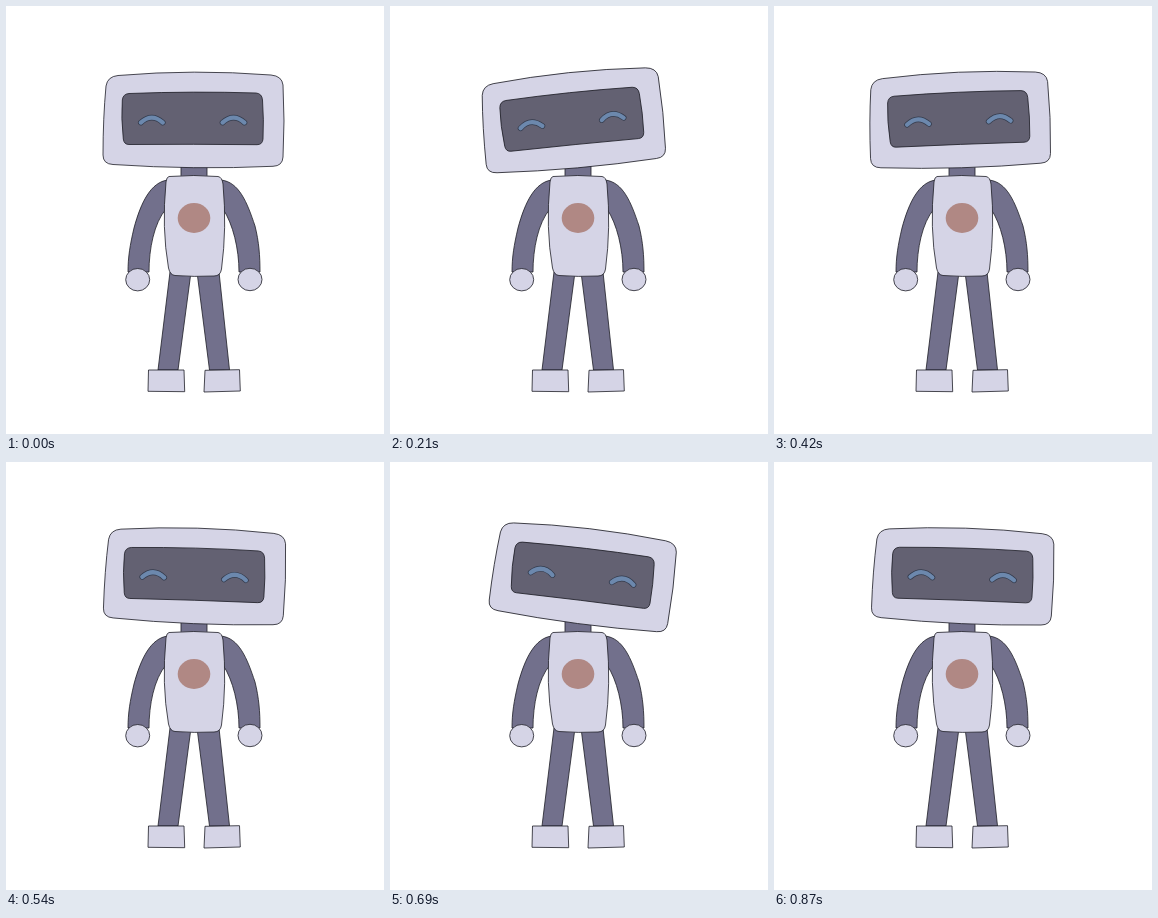
An HTML page with a canvas for the animation above (0.9 s loop, 378 px wide and 428 px high).

```html
<!DOCTYPE html>
<html lang="en">
<head>
<meta charset="utf-8">
<title>Robot tilting its head</title>
<style>
  html, body { margin: 0; width: 100%; height: 100%; overflow: hidden; background: #fff; }
  canvas { display: block; width: 378px; height: 428px; }
</style>
</head>
<body>
<canvas id="stage" width="378" height="428"></canvas>
<script>
const ctx = document.getElementById('stage').getContext('2d');

const LOOP = 900, STEP = 30;
const LIGHT = '#d5d4e6', LIMB = '#72708c', SCREEN = '#636172';
const EYE = '#6c88ad', HEART = '#b08884', INK = '#1d1d26';
const PIVOT = { x: 189, y: 162 };

// Head tilt in degrees: [time, angle], linear between the turning points.
const TILT = [[0, 0], [270, -7.4], [705, 7.4], [900, 1]];

function tiltAt(t) {
  const i = TILT.findIndex(([end]) => t < end);
  const [t0, a0] = TILT[i - 1], [t1, a1] = TILT[i];
  return a0 + (a1 - a0) * (t - t0) / (t1 - t0);
}

function shape(d, fill) {
  const path = new Path2D(d);
  ctx.fillStyle = fill;
  ctx.fill(path);
  ctx.strokeStyle = INK;
  ctx.lineWidth = 0.8;
  ctx.stroke(path);
}

function oval(x, y, rx, ry, fill, outlined) {
  ctx.beginPath();
  ctx.ellipse(x, y, rx, ry, 0, 0, Math.PI * 2);
  ctx.fillStyle = fill;
  ctx.fill();
  if (!outlined) return;
  ctx.strokeStyle = INK;
  ctx.lineWidth = 0.8;
  ctx.stroke();
}

function eye(x, y) {
  const arc = new Path2D(`M${x - 11} ${y + 2.6}Q${x} ${y - 7.4} ${x + 11} ${y + 2.6}`);
  ctx.lineCap = 'round';
  for (const [width, color] of [[5.6, '#343b4c'], [4.2, EYE]]) {
    ctx.lineWidth = width;
    ctx.strokeStyle = color;
    ctx.stroke(arc);
  }
}

function drawBody() {
  shape('M175 158H201V174H175Z', LIMB);
  // arms
  shape('M162 174C145 176 135 196 128 222C124 239 122 251 122 266L143 266C143 243 148 217 160 203Z', LIMB);
  shape('M215 174C233 176 241 196 249 220C253 236 254 250 254 266L233 266C233 243 227 218 217 203Z', LIMB);
  oval(131.7, 273.7, 12, 11.2, LIGHT, true);
  oval(244, 273.5, 12, 11.2, LIGHT, true);
  // legs
  shape('M164 266H185L172 364H152Z', LIMB);
  shape('M191 266H213L223.500 364H203.500Z', LIMB);
  shape('M142.500 364L178 364L178.700 385.700L142 385.300Z', LIGHT);
  shape('M199 364.300L233.500 363.700L234.300 385L198 386Z', LIGHT);
  // torso
  shape('M163 170.500Q188 168.500 212 170.500Q216 171 217 178Q221 222 215.500 263Q214.500 270 208 270Q188 271 169 269.500Q164 269 162.500 262Q155.500 222 160 176Q160.500 171 163 170.500Z', LIGHT);
  oval(188, 212, 16.3, 15, HEART, false);
}

function drawHead(degrees) {
  ctx.save();
  ctx.translate(PIVOT.x, PIVOT.y);
  ctx.rotate(degrees * Math.PI / 180);
  ctx.translate(-PIVOT.x, -PIVOT.y);
  shape('M112 69.500Q188 63 265 69Q276 70 277 79Q279 115 277 151Q276.500 160 267 160.300Q188 164 107 158.500Q97 158 97 149Q97 112 100 80Q101.500 70.500 112 69.500Z', LIGHT);
  shape('M123 87.500Q188 85 250 87Q256 87.500 256.500 94Q258 114 257 133Q256.500 138.700 251 138.700Q188 138 123 138.500Q118 138.500 117.300 133Q115 112 116.300 94Q117 88 123 87.500Z', SCREEN);
  eye(145.800, 114);
  eye(227.500, 114);
  ctx.restore();
}

function render(now) {
  const t = Math.floor((now % LOOP) / STEP) * STEP;
  ctx.fillStyle = '#fff';
  ctx.fillRect(0, 0, 378, 428);
  drawBody();
  drawHead(tiltAt(t));
}

let start;
function tick(now) {
  start ??= now;
  render(Math.max(0, now - start));
  requestAnimationFrame(tick);
}

render(0);
requestAnimationFrame(tick);
</script>
</body>
</html>
```
